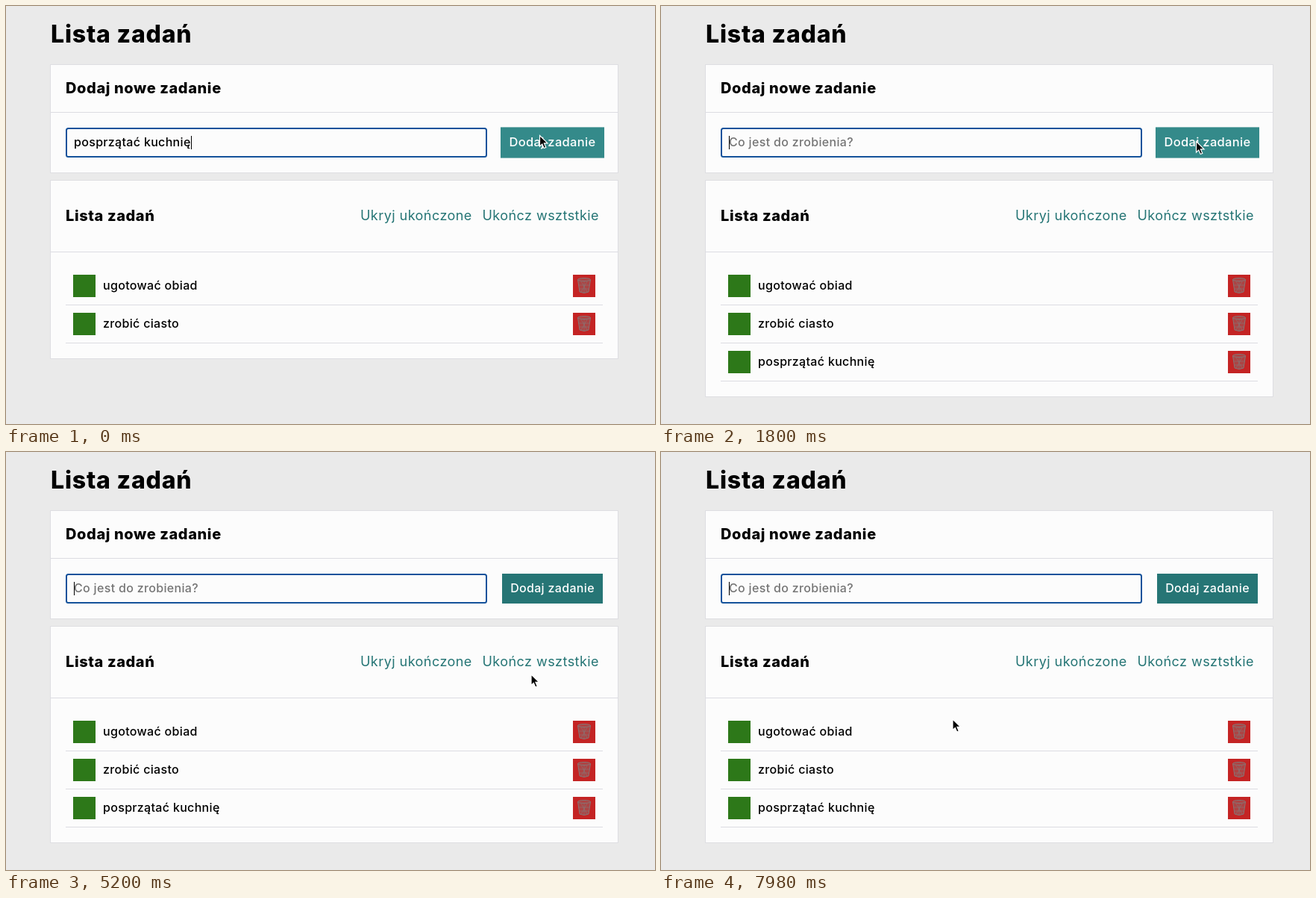
These frames come from a looping animation (870 by 560 pixels, 8 s). An HTML page:

```html
<!DOCTYPE html>
<html lang="pl">
<head>
<meta charset="utf-8">
<title>Lista zadań</title>
<style>
  html, body { margin: 0; width: 100%; height: 100%; overflow: hidden; background: #eaeaea; }
  svg { display: block; }
  text { font: 500 16px Inter, "Open Sans", sans-serif; letter-spacing: .02em; }
  .title { font-size: 32px; font-weight: 800; letter-spacing: .025em; }
  .heading { font-size: 20px; font-weight: 800; letter-spacing: .03em; }
  .link { font-size: 18px; font-weight: 400; letter-spacing: .025em; fill: #257575; }
  .card { fill: #fcfcfc; stroke: #dedee2; }
  .line { stroke: #dcdce2; }
  .done { fill: #2d7819; }
  .remove { fill: #c42424; }
  .bin { fill: #ac4444; stroke: #877676; }
</style>
</head>
<body>
<svg width="870" height="560" viewBox="0 0 870 560">
  <defs>
    <g id="row">
      <rect class="done" x="90" y="360" width="30" height="30"/>
      <rect class="remove" x="760" y="360" width="30" height="30"/>
      <g class="bin">
        <path d="M766.5 366.5L769 383Q775 386 781 383L783.5 366.5Z"/>
        <ellipse cx="775" cy="366.5" rx="8.5" ry="2"/>
        <path d="M771 369L779 383M779 369L771 383M775 369V384M768 374H782M769 379H781" stroke-width=".6"/>
      </g>
      <path class="line" d="M80 400.5H800"/>
    </g>
  </defs>

  <text class="title" x="60" y="49">Lista zadań</text>

  <rect class="card" x="59.5" y="78.5" width="761" height="145"/>
  <path class="line" d="M60 142.5H820"/>
  <text class="heading" x="80" y="117">Dodaj nowe zadanie</text>
  <rect id="field" fill="#fcfcfc"/>
  <text id="entry" x="91" y="188"></text>
  <path id="caret" stroke="#000"/>
  <g id="button">
    <rect id="face" x="665" y="163" width="135" height="40"/>
    <text x="732.5" y="188" fill="#fff" text-anchor="middle">Dodaj zadanie</text>
  </g>

  <rect class="card" id="list" x="59.5" y="233.5" width="761"/>
  <path class="line" d="M60 329.5H820"/>
  <text class="heading" x="80" y="288">Lista zadań</text>
  <text class="link" x="475" y="287">Ukryj ukończone</text>
  <text class="link" x="638.5" y="287">Ukończ wsztstkie</text>
  <use href="#row"/>
  <text x="130" y="380">ugotować obiad</text>
  <use href="#row" y="51"/>
  <text x="130" y="431">zrobić ciasto</text>
  <g id="added">
    <use href="#row" y="102"/>
    <text x="130" y="482">posprzątać kuchnię</text>
  </g>

  <path id="cursor" d="M0 0V14.5L3.3 11.4L5.7 17L8.3 15.9L5.9 10.4H10.5Z" stroke="#fff" stroke-width="1.2"/>
</svg>
<script>
const LOOP = 8000, PRESS = 26, RELEASE = 32, BLINK = 15;
const TASK = "posprzątać kuchnię", HINT = "Co jest do zrobienia?";
const $ = id => document.getElementById(id);
const set = (id, attrs) => {
  for (const name in attrs) $(id).setAttribute(name, attrs[name]);
};

// Pointer stops: step, x, y
const stops = [
  [0, 715.5, 173.5], [3, 715.5, 173.5], [14, 717.5, 181.5], [74, 717.5, 181.5],
  [91, 704, 298], [114, 704, 298], [131, 758, 359.5], [138, 758, 359.5], [168, 391, 358]
];

// Screen updates come in threes, lasting 20, 100 and 20 ms.
function stepAt(ms) {
  const rest = ms % 140;
  return 3 * Math.floor(ms / 140) + (rest < 20 ? 0 : rest < 120 ? 1 : 2);
}

function pointerAt(step) {
  const i = stops.findIndex(stop => stop[0] > step);
  if (i < 0) return stops.at(-1).slice(1);
  const [t0, x0, y0] = stops[i - 1], [t1, x1, y1] = stops[i];
  const u = (step - t0) / (t1 - t0), k = u * u * (3 - 2 * u);
  return [x0 + (x1 - x0) * k, y0 + (y1 - y0) * k];
}

function draw(step) {
  const [x, y] = pointerAt(step);
  const added = step >= RELEASE;
  const pressed = step >= PRESS && !added;
  const hover = x >= 665 && x <= 800 && y >= 163 && y <= 203;

  set("cursor", { transform: `translate(${x} ${y})` });
  set("button", { transform: hover ? "translate(732.5 183) scale(1.03) translate(-732.5 -183)" : "" });
  set("face", { fill: pressed ? "#40a9a9" : hover ? "#348a8a" : "#267575" });

  set("field", pressed
    ? { x: 80.5, y: 163.5, width: 564, height: 39, rx: 0, stroke: "#dcdce2", "stroke-width": 1 }
    : { x: 81, y: 164, width: 563, height: 38, rx: 2.5, stroke: "#14529b", "stroke-width": 2 });
  $("entry").textContent = added ? HINT : TASK;
  set("entry", { fill: added ? "#757575" : "#000" });

  const caretX = added ? 91.5 : Math.round(91 + $("entry").getComputedTextLength()) + .5;
  const blinkStep = added ? step - RELEASE : step;
  set("caret", {
    d: `M${caretX} 174V192`,
    visibility: !pressed && blinkStep % BLINK < BLINK / 2 ? "visible" : "hidden"
  });

  set("list", { height: added ? 290 : 239 });
  set("added", { visibility: added ? "visible" : "hidden" });
}

const start = performance.now();
function tick() {
  draw(stepAt((performance.now() - start) % LOOP));
  requestAnimationFrame(tick);
}
tick();
</script>
</body>
</html>
```
